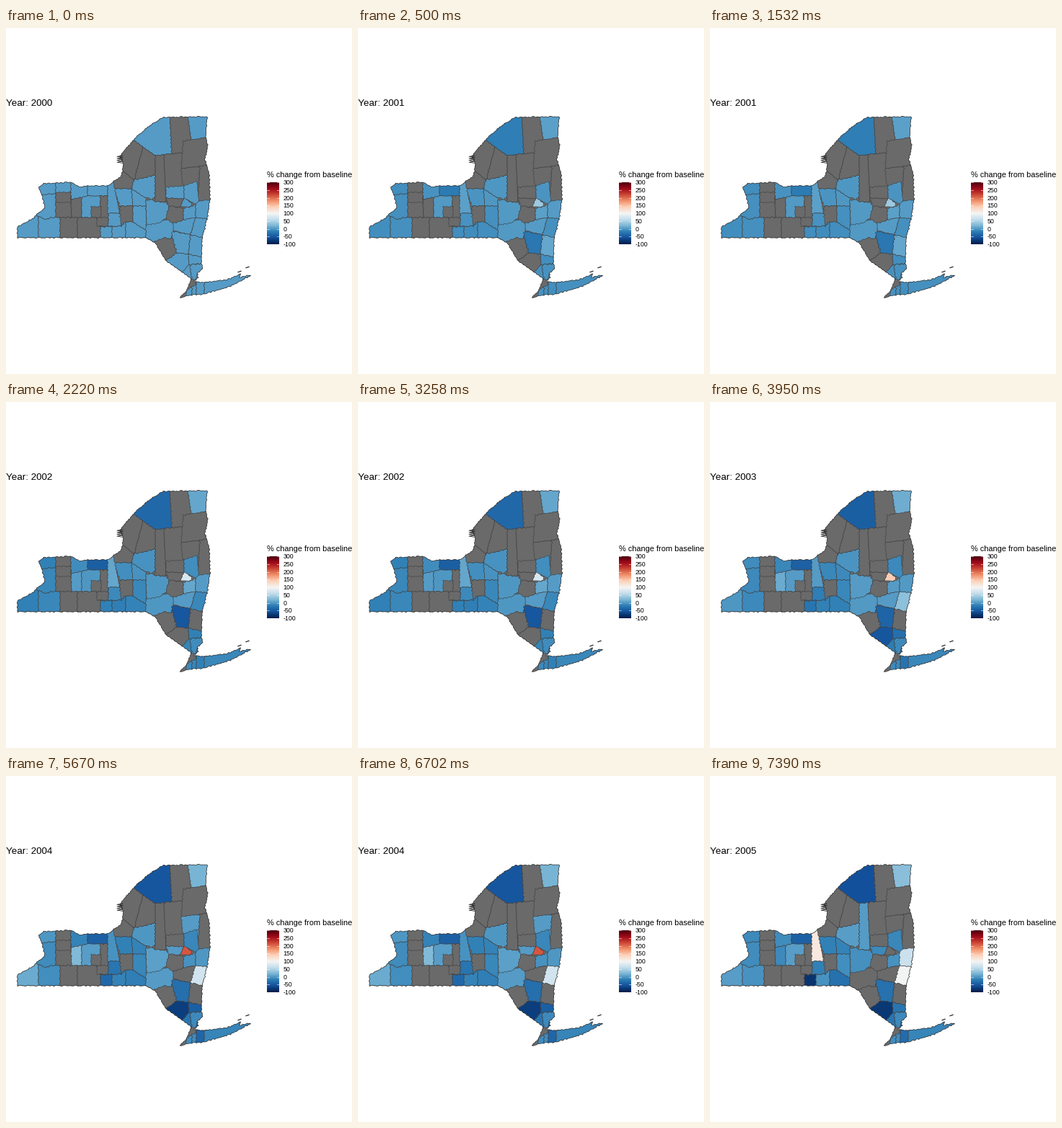
Write a matplotlib script that moves like this. It is 480 by 480 pixels and loops after 8000 ms.

```python
import matplotlib.pyplot as plt
import numpy as np
from matplotlib.animation import FuncAnimation
from matplotlib.collections import PolyCollection
from matplotlib.colors import ListedColormap, Normalize
from matplotlib.patches import Polygon

SIZE, DPI = 480, 100
LOOP, STEP = 8000, 20
CHANGES = (500, 2220, 3950, 5670, 7390)   # ms at which the year advances
PX = 72 / DPI                             # points per pixel
GAMMA = 1.273                             # darkening of the whole palette

cmap = ListedColormap(plt.get_cmap("RdBu_r")(np.linspace(0, 1, 256)) ** GAMMA)
cmap.set_bad((0.5 ** GAMMA,) * 3)
norm = Normalize(-100, 300)
rng = np.random.default_rng(7)
waves = rng.uniform(0.5, 1.3, (4, 2)) * rng.choice([-1, 1], (4, 2))
phases = rng.uniform(0, 2 * np.pi, (4, 2))


def roughen(points):
    """Subdivide a closed line and shift it by a fixed field of sines."""
    p = np.array([*points, points[0]], float)
    dist = np.r_[0, np.cumsum(np.hypot(*np.diff(p, axis=0).T))]
    s = np.arange(0, dist[-1], 1.2)
    line = np.column_stack([np.interp(s, dist, p[:, k]) for k in (0, 1)])
    return line + 0.28 * np.sin((line @ waves.T)[:, :, None] + phases).sum(axis=1)


def trend(mid, late, last=None, missing=()):
    """Yearly change, interpolated from 2000 through 2002 and 2004 to 2005."""
    keys = [0, mid, late, late if last is None else last]
    values = np.interp(range(6), [0, 2, 4, 5], keys)
    values[list(missing)] = np.nan
    return values


GRAY = trend(0, 0, missing=range(6))
shapes, changes = [], []


def part(line, start, end):
    """The stretch of a left-to-right line between two x positions."""
    xs, ys = zip(*line) if isinstance(line, list) else ((0, SIZE), (line, line))
    cut = [start, *(x for x in xs if start < x < end), end]
    return list(zip(cut, np.interp(cut, xs, ys)))


def strip(top, bottom, cuts, *trends):
    """Split the band between two lines into counties; later strips lie on top.

    A cut is one x, or a pair of its x at the top and at the bottom."""
    cuts = [c if isinstance(c, tuple) else (c, c) for c in cuts]
    for (t0, b0), (t1, b1), values in zip(cuts, cuts[1:], trends):
        shapes.append(roughen(part(top, t0, t1) + part(bottom, b0, b1)[::-1]))
        changes.append(values)


# Lines shared by neighbouring strips
plain = [(40, 232), (69, 230), (89, 228), (91, 238), (113, 233), (141, 233)]
tier = [(10, 250), (42, 260), (56, 266), (62, 263), (125, 263), (131, 276),
        (159, 275), (166, 269), (176, 269), (194, 280)]
tug_hill = [(140, 198), (162, 198), (178, 211), (207, 204)]
valley = [(144, 223), (174, 223), (190, 234), (203, 238), (208, 232)]
foothills = [(177, 156), (190, 165), (207, 177), (246, 173), (248, 157), (285, 151)]
lakes = [(243, 195), (269, 192), (290, 189)]
capital = [(222, 264), (232, 271), (247, 266), (263, 263), (290, 266)]
highlands = [(205, 325), (222, 323), (237, 312), (253, 314), (273, 318)]

# West
strip(205, plain, (40, 69, 90, 113, 141),
      trend(-18, -3, -12), trend(0, 0, missing=range(1, 6)),
      trend(-10, -16, -10), trend(-46, -44))
strip(plain, tier, (40, 69, (90, 91), 105, 131, (141, 142)),
      trend(-13, -10), GRAY, trend(0, 22, -12, missing=(0, 1)), trend(-2, 2), GRAY)
strip(228, 242, (69, 90), GRAY)
strip(248, 263, (118, 132), GRAY)
strip(tier, 291, (10, 45, 75, 99, 131, 147, 166, 194),
      trend(-18, 12, 2), trend(-13, -9, -5), GRAY, GRAY, trend(-18, -38, -80),
      trend(-20, -16, -5), trend(-16, -20, -30))
strip(263, 275, (126, 142), GRAY)

# Centre
strip(tug_hill, valley, (144, (178, 174), 207), GRAY, trend(-6, -3, 3))
strip(valley, 247, ((150, 158), (174, 176), 194), trend(-9, -18), trend(-5, -17))
strip(247, tier, (158, 176, (194, 195)), GRAY, trend(-14, -13, -8))
strip(210, 257, (141, (148, 158)), trend(8, -5, 115))
strip(257, 275, (142, (158, 160)), trend(-12, -27, -18))

# North
strip(115, foothills, (177, (227, 230), (251, 257), 290),
      trend(-38, -54, -58), GRAY, trend(8, 18, 28))
strip([(140, 156)] + foothills, tug_hill, (140, (190, 178), 207), GRAY, GRAY)
strip(foothills, 241, (207, (219, 222), (246, 247)),
      trend(0, 0, missing=range(5)), GRAY)
strip([(246, 157), (290, 150)], lakes, ((246, 243), 290), GRAY)
strip(lakes, 240, ((243, 247), (269, 266), 290),
      trend(0, 0, missing=(0, 1, 2, 3, 5)), GRAY)

# Upper Hudson
strip([(194, 272), (232, 264)], [(194, 291), (207, 298), (220, 291), (235, 294)],
      (194, (232, 233)), trend(-2, 0, missing=[5]))
strip([(194, 239), (203, 238), (208, 241), (222, 242), (227, 247)],
      [(195, 274), (213, 270), (226, 261)], ((194, 195), (226, 224)),
      trend(-3, 4, -7))
strip([(222, 221), (247, 219), (264, 213)], [(222, 236), (247, 237), (268, 246)],
      (222, 247, (265, 268)), trend(0, 0, missing=range(1, 6)), trend(-9, -13))
strip([(222, 236), (249, 237), (259, 245)], 248, ((222, 226), (247, 242), (258, 257)),
      trend(0, 0, -12, missing=range(4)), trend(75, 212, missing=[5]))
strip([(226, 247), (246, 250), (258, 248), (268, 240), (290, 238)], capital,
      ((226, 222), 246, 263, 290), GRAY, trend(8, -5), trend(0, -3, 65))
strip(capital, [(232, 281), (256, 287), (272, 291)], (232, (263, 256), (290, 272)),
      trend(0, 0, missing=(4, 5)), trend(-13, 70, 98))

# Lower Hudson and the coast
strip([(205, 297), (220, 291), (229, 293), (231, 282), (256, 287), (273, 291)],
      highlands, (205, (230, 237), (256, 253), 273),
      GRAY, trend(-52, -32, -30), trend(16, 0, missing=range(2, 6)))
strip(highlands, [(222, 324), (245, 339), (254, 329), (273, 326)],
      (222, (253, 254), 273),
      trend(-36, -72, -78, missing=(1, 2)), trend(-18, -46, -28))
strip([(240, 342), (254, 329), (280, 326)], [(240, 345), (258, 349), (280, 353)],
      (240, (255, 258), 280), trend(-15, -27), trend(-10, -12))
strip([(250, 364), (263, 356), (265, 340), (345, 325)], 380, (250, 258, 264, 275, 345),
      trend(-12, -10), trend(-14, -10), trend(-18, -40, -35), trend(-13, -15))

outline = [
    (16, 291), (16, 276), (36, 265), (54, 249), (50, 232), (45, 221), (53, 216),
    (90, 214), (103, 221), (113, 219), (141, 219), (160, 206), (163, 189), (158, 178),
    (177, 155), (189, 144), (203, 133), (218, 124), (279, 123), (277, 150), (280, 164),
    (276, 182), (282, 203), (283, 238), (279, 265), (272, 292), (271, 326), (273, 334),
    (265, 340), (267, 346), (261, 352), (275, 353), (308, 349), (326, 341), (323, 346),
    (340, 343), (312, 358), (276, 369), (252, 371), (241, 375), (250, 365), (256, 352),
    (257, 348), (245, 339), (222, 323), (207, 298), (194, 291)]

values = np.ma.masked_invalid(np.array(changes).T)

plt.rcParams["font.family"] = "Liberation Sans"
fig = plt.figure(figsize=(SIZE / DPI, SIZE / DPI), dpi=DPI, facecolor="white")
ax = fig.add_axes([0, 0, 1, 1])
ax.axis("off")

state = roughen(outline)
land = ax.add_patch(Polygon(state, fc=cmap.get_bad(), ec="none", zorder=1))
counties = PolyCollection(shapes, cmap=cmap, norm=norm, edgecolors="#404040",
                          linewidths=0.6 * PX, zorder=2)
ax.add_collection(counties, autolim=False)
counties.set_clip_path(land)
ax.add_patch(Polygon(state, fc="none", ec="#303030", lw=0.7 * PX, zorder=3))

# Ragged bay in the north-west and two islets in the east
k = np.arange(9)
ax.plot(158 + 4 * (-1.0) ** k, 177 + 1.3 * k, color="#202020", lw=0.8 * PX)
for x, y in ((324, 338), (335, 332)):
    ax.plot([x - 2, x + 2], [y + 0.7, y - 0.7], color="#202020", lw=1.2 * PX)


def label(x, y, text, size):
    return ax.text(x, y, text, fontsize=size * PX, color="black")


title = label(0, 108, "", 13.4)
label(362, 207, "% change from baseline", 11)

# Colour bar with white ticks on both edges
LEFT, RIGHT, TOP, BOTTOM = 362, 379, 214, 300
ax.imshow(np.linspace(300, -100, 256)[:, None], cmap=cmap, norm=norm, aspect="auto",
          extent=(LEFT, RIGHT, BOTTOM, TOP), interpolation="bilinear")
for level in range(-100, 301, 50):
    y = np.interp(level, (-100, 300), (BOTTOM, TOP))
    for x in (LEFT, RIGHT - 3.4):
        ax.plot([x, x + 3.4], [y, y], color="white", lw=0.6 * PX)
    label(384.5, y + 3.2, str(level), 8.8)
ax.set(xlim=(0, SIZE), ylim=(SIZE, 0))


def update(frame):
    now = frame * STEP + STEP / 2
    year = sum(now >= t for t in CHANGES)
    counties.set_array(values[year])
    title.set_text(f"Year: {2000 + year}")
    return counties, title


anim = FuncAnimation(fig, update, frames=LOOP // STEP, interval=STEP,
                     repeat=True, repeat_delay=0)
plt.show()
```
